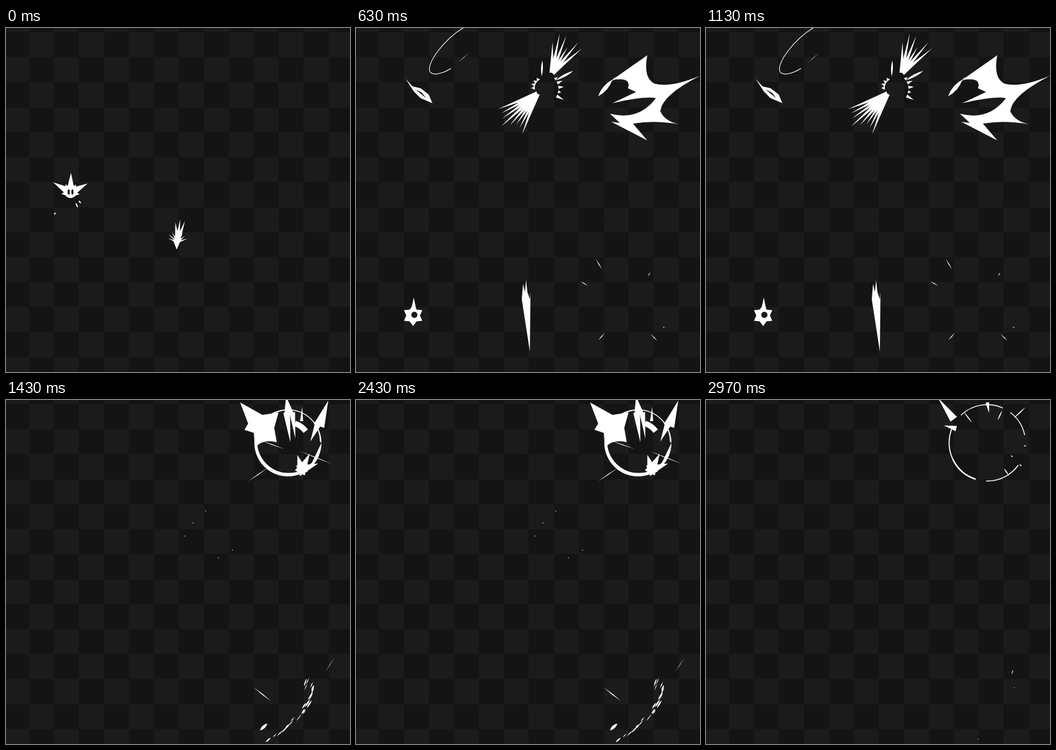
Write an HTML page with a canvas that moves like this. It is 554 px wide and 554 px high and loops after 3 s.

```html
<!DOCTYPE html>
<html lang="en">
<head>
<meta charset="utf-8">
<title>Impact effects</title>
<style>
html, body { margin: 0; width: 100%; height: 100%; overflow: hidden; background: #141414; }
canvas { display: block; width: 554px; height: 554px; }
</style>
</head>
<body>
<canvas id="stage" width="554" height="554"></canvas>
<script>
const ctx = document.getElementById('stage').getContext('2d');
const SIZE = 554, CELL = 40.23, STEPS = 15, DIAG = -0.85;

function board() {
  const edge = (i, shift) => Math.round(i * CELL - shift);
  ctx.fillStyle = '#141414';
  ctx.fillRect(0, 0, SIZE, SIZE);
  ctx.fillStyle = '#1b1b1b';
  for (let i = 0; i < STEPS; i++) {
    for (let j = i % 2; j < STEPS; j += 2) {
      const x = edge(i, 3.3), y = edge(j, 33.3);
      ctx.fillRect(x, y, edge(i + 1, 3.3) - x, edge(j + 1, 33.3) - y);
    }
  }
}

function random(seed) {
  seed *= 7919;
  return () => (seed = (seed * 16807) % 2147483647) / 2147483647;
}

function fill(path) {
  ctx.fill(new Path2D(path), 'evenodd');
}

// Draws something stretched about a point.
function scaled(x, y, sx, sy, paint) {
  ctx.save();
  ctx.translate(x, y);
  ctx.scale(sx, sy);
  ctx.translate(-x, -y);
  paint();
  ctx.restore();
}

// Widest in the middle, pointed at both ends.
function streak(x1, y1, x2, y2, w) {
  const len = Math.hypot(x2 - x1, y2 - y1) || 1;
  const nx = -(y2 - y1) / len * w, ny = (x2 - x1) / len * w;
  const mx = (x1 + x2) / 2, my = (y1 + y2) / 2;
  ctx.beginPath();
  ctx.moveTo(x1, y1);
  ctx.quadraticCurveTo(mx + nx, my + ny, x2, y2);
  ctx.quadraticCurveTo(mx - nx, my - ny, x1, y1);
  ctx.fill();
}

// Wide at its foot, pointed at its tip.
function spike(x1, y1, x2, y2, w) {
  const len = Math.hypot(x2 - x1, y2 - y1) || 1;
  const nx = -(y2 - y1) / len * w / 2, ny = (x2 - x1) / len * w / 2;
  ctx.beginPath();
  ctx.moveTo(x1 + nx, y1 + ny);
  ctx.lineTo(x2, y2);
  ctx.lineTo(x1 - nx, y1 - ny);
  ctx.fill();
}

function radial(draw, x, y, a, near, far, w) {
  const c = Math.cos(a), s = Math.sin(a);
  draw(x + c * near, y + s * near, x + c * far, y + s * far, w);
}

function rays(x, y, w, list) {
  for (const [a, near, far] of list) radial(streak, x, y, a, near, far, w);
}

// Spikes spread evenly about a middle angle, with varied lengths.
function fan(x, y, near, far, mid, spread, n, w, seed) {
  const rnd = random(seed);
  for (let i = 0; i < n; i++) {
    const a = mid + spread * (2 * i / (n - 1) - 1);
    radial(spike, x, y, a, near, far * (0.7 + 0.3 * rnd()), w);
  }
}

// A jagged star, hollow when hole > 0, stretched along its turn angle.
function burst(x, y, r, hole, n, seed, turn = 0, squash = 1) {
  const rnd = random(seed);
  ctx.save();
  ctx.translate(x, y);
  ctx.rotate(turn);
  ctx.scale(1, squash);
  ctx.beginPath();
  const ring = (low, high) => {
    for (let i = 0; i < n * 2; i++) {
      const a = (i + rnd() * 0.5) * Math.PI / n;
      const d = i % 2 ? low : low + (high - low) * (0.35 + rnd() * 0.65);
      ctx[i ? 'lineTo' : 'moveTo'](Math.cos(a) * d, Math.sin(a) * d);
    }
    ctx.closePath();
  };
  ring(Math.max(r * 0.42, hole), r);
  if (hole) ring(hole * 0.8, hole * 1.02);
  ctx.fill('evenodd');
  ctx.restore();
}

function spray(x, y, near, far, n, w, seed, turn = 0, squash = 1) {
  const rnd = random(seed);
  ctx.save();
  ctx.translate(x, y);
  ctx.rotate(turn);
  ctx.scale(1, squash);
  for (let i = 0; i < n; i++) {
    const a = (i + rnd() * 0.7) * 2 * Math.PI / n;
    const from = near + (far - near) * rnd() * 0.5;
    radial(streak, 0, 0, a, from, from + (far - near) * (0.15 + rnd() * 0.35), w);
  }
  ctx.restore();
}

function arc(x, y, r, from, to, w) {
  ctx.lineWidth = w;
  ctx.beginPath();
  ctx.arc(x, y, r, from, to);
  ctx.stroke();
}

function crown() {
  fan(104, 265, 6, 41, -1.55, 1.06, 3, 12, 5);
  fan(104, 265, 6, 20, -1.55, 1.75, 4, 9, 2);
  ctx.beginPath();
  ctx.arc(104, 264, 10, 0, 7);
  for (const x of [101, 107]) {
    ctx.moveTo(x + 1.7, 264);
    ctx.ellipse(x, 264, 1.7, 4.5, 0, 0, 7);
  }
  ctx.fill('evenodd');
}

function torch() {
  fan(276, 345, 0, 42, -1.45, 0.22, 3, 8, 4);
  fan(276, 345, 2, 20, -1.55, 1.2, 8, 3, 6);
  spike(275, 343, 275, 357, 11);
}

function swoosh(w) {
  ctx.lineWidth = w;
  ctx.stroke(new Path2D('M174 -1C142 18 113 57 119 70C123 78 141 73 153 65'));
  streak(164, 56, 182, 40, 0.6);
}

function sliver() {
  fill('M80 82L91 94 104 97 117 107 123 121 104 113 93 102ZM96 99L113 113 106 104Z');
}

function clash() {
  fan(315, 74, 2, 68, -1.12, 0.42, 6, 7, 3);
  fan(292, 106, 0, 82, 2.35, 0.42, 8, 8, 8);
  fan(302, 98, 24, 38, -0.1, 0.6, 5, 5, 4);
  fan(302, 96, 14, 24, 3.6, 0.5, 4, 6, 7);
  streak(300, 52, 299, 78, 3);
  streak(350, 69, 322, 84, 4);
}

function wing() {
  fill('M469 44Q462 82 482 90Q508 96 554 77Q493 108 490 134Q497 150 520 155Q480 148 446 154L469 181 411 151 425 153 409 138Q455 150 483 113Q466 109 413 121L451 103 438 97Q444 78 412 84Z');
  streak(390, 110, 413, 83, 7);
  streak(411, 87, 418, 78, 1);
}

function cog() {
  ctx.beginPath();
  for (let i = 0; i < 12; i++) {
    const a = (i - 3) * Math.PI / 6, r = i % 2 ? 11 : 17;
    ctx.lineTo(92 + Math.cos(a) * r, 463 + Math.sin(a) * r);
  }
  ctx.closePath();
  ctx.moveTo(99, 462);
  ctx.arc(94, 462, 5, 0, 7);
  ctx.fill('evenodd');
  spike(93, 453, 93, 434, 8);
}

function spear() {
  fill('M274 406L276 425 280 437 281 425 280 521 267 437 269 412 272 425Z');
}

function horns() {
  fill('M377 4L413 24 439 20 432 45 436 68Q413 62 401 77L399 53 384 48 390 38Z');
  spike(456, 24, 451, -6, 16);
  spike(452, 20, 458, 68, 11);
  spike(461, 20, 466, 62, 9);
  spike(476, 34, 477, 11, 5);
  spike(504, 42, 519, 1, 18);
  spike(502, 40, 490, 67, 10);
  arc(454, 72, 36, -1.25, -0.65, 9);
  fan(476, 112, -6, 30, -1.1, 0.75, 3, 18, 6);
  ctx.beginPath();
  ctx.arc(454, 69, 54, 0, 7);
  ctx.arc(455, 67, 50.5, 0, 7, true);
  ctx.fill('evenodd');
}

function whiskers() {
  streak(390, 131, 422, 109, 1.3);
  streak(472, 82, 525, 103, 1.3);
  streak(409, 65, 449, 79, 1.2);
}

// Short slanting flecks strewn along a bent line.
function embers() {
  const rnd = random(12), n = 24;
  const along = (p, a, b, c) => (1 - p) ** 2 * a + 2 * p * (1 - p) * b + p * p * c;
  for (let i = 0; i < n; i++) {
    const p = i / (n - 1);
    const x = along(p, 480, 518, 424) + 9 * (rnd() - 0.5);
    const y = along(p, 452, 484, 549) + 9 * (rnd() - 0.5);
    radial(streak, x, y, 1.9 + 0.5 * p, -6, 3 + 6 * rnd(), 1 + 1.6 * rnd());
  }
  streak(399, 463, 427, 485, 1.6);
  streak(529, 415, 514, 438, 0.6);
  streak(421, 521, 409, 532, 5);
}

function sparks() {
  for (const [x, y] of [[321, 178], [300.5, 197.5], [287.5, 218.5], [341.5, 253.5], [364, 241]]) {
    ctx.fillRect(x, y, 1.2, 1.2);
  }
}

function remains() {
  spike(399, 31, 374, -3, 13);
  spike(403, 46, 383, 41, 9);
  spike(453, 4, 456, 21, 6);
  for (const [from, to, w] of [[1.88, 2.7, 2.4], [2.7, 3.58, 1.7], [0.62, 1.6, 1.5], [3.95, 5.13, 1.4], [5.36, 6.08, 1.4]]) {
    arc(453, 69, 61.5, from, to, w);
  }
  rays(453, 69, 1.8, [[-2.22, 41, 62], [-1.14, 40, 57], [-0.75, 58, 84], [0.08, 59, 63], [0.59, 62, 67], [0.5, 43, 47], [0.99, 49, 63]]);
  streak(494.5, 434, 492.5, 442, 1.4);
  ctx.fillRect(496, 463, 1, 1);
  ctx.fillRect(438, 546, 1, 1);
}

const steps = [
  () => {
    crown();
    torch();
    rays(104, 264, 2.2, [[1.13, 19, 28], [0.83, 19, 25], [2.2, 41, 45]]);
  },
  () => {
    scaled(103, 265, 1.5, 1.5, crown);
    scaled(275, 350, 1.3, 1.9, torch);
    burst(440, 440, 45, 0, 9, 4);
  },
  () => {
    burst(102, 262, 62, 34, 10, 8);
    scaled(275, 350, 1.2, 2.3, torch);
    burst(440, 440, 72, 38, 11, 5);
    burst(295, 95, 30, 0, 9, 6, DIAG, 0.5);
  },
  () => {
    spray(102, 262, 46, 72, 9, 1.8, 9);
    spray(278, 300, 18, 60, 7, 1.5, 3, Math.PI / 2, 0.4);
    spray(440, 440, 55, 88, 11, 2, 5);
    burst(292, 95, 68, 10, 13, 7, DIAG, 0.5);
    burst(425, 115, 48, 0, 8, 3);
    streak(80, 82, 123, 121, 5);
  },
  () => {
    swoosh(1.1);
    sliver();
    clash();
    wing();
    cog();
    spear();
    rays(435, 452, 1.3, [[-2.12, 74, 94], [-2.6, 71, 86], [2.29, 52, 68], [-0.98, 63, 70], [0.8, 57, 72], [0.46, 66, 69]]);
  },
  () => {
    swoosh(0.7);
    rays(102, 102, 1.4, [[-2.4, 5, 24], [0.75, 12, 28]]);
    spray(296, 92, 42, 92, 15, 3, 5, DIAG, 0.45);
    spray(460, 105, 50, 105, 10, 4, 7, 0, 0.7);
    scaled(92, 462, 1.6, 1.6, cog);
    scaled(275, 450, 1.3, 1.1, spear);
  },
  () => {
    spray(296, 92, 60, 98, 11, 1.2, 5, DIAG, 0.45);
    spray(460, 105, 65, 105, 8, 1.6, 7, 0, 0.7);
    burst(92, 462, 54, 29, 9, 3);
    scaled(275, 450, 0.8, 1.2, spear);
  },
  () => {
    burst(92, 462, 62, 42, 9, 4);
    streak(275, 400, 278, 520, 3);
    burst(325, 215, 24, 0, 8, 4);
  },
  () => {
    spray(92, 462, 45, 70, 9, 1.6, 5);
    streak(276, 440, 278, 512, 1.2);
    burst(325, 215, 46, 18, 9, 5);
    burst(454, 70, 24, 0, 8, 8);
  },
  () => {
    spray(92, 462, 58, 75, 6, 0.9, 5);
    burst(325, 215, 50, 32, 10, 6);
    burst(454, 70, 52, 0, 9, 9);
    burst(450, 495, 30, 0, 10, 4, DIAG, 0.6);
  },
  () => {
    spray(325, 215, 32, 54, 11, 2, 6);
    burst(454, 70, 76, 18, 10, 9);
    burst(452, 495, 66, 12, 13, 5, DIAG, 0.55);
  },
  () => {
    spray(325, 215, 38, 54, 9, 1.4, 6);
    scaled(454, 70, 0.9, 0.9, horns);
    burst(454, 70, 48, 24, 9, 5);
    burst(453, 495, 80, 34, 15, 5, DIAG, 0.55);
  },
  () => {
    spray(325, 215, 40, 52, 7, 1, 6);
    scaled(454, 70, 0.97, 0.97, horns);
    whiskers();
    embers();
    burst(453, 495, 68, 44, 14, 6, DIAG, 0.55);
  },
  () => {
    horns();
    whiskers();
    sparks();
    embers();
  },
  remains
];

// Thirty steps a second, on ticks of 10 ms.
function stepAt(ms) {
  const rest = ms % 100;
  return (Math.floor(ms / 100) * 3 + (rest >= 70 ? 2 : rest >= 30 ? 1 : 0)) % STEPS;
}

const start = performance.now();
function draw() {
  board();
  ctx.fillStyle = ctx.strokeStyle = '#fff';
  steps[stepAt(performance.now() - start)]();
  requestAnimationFrame(draw);
}
draw();
</script>
</body>
</html>
```
